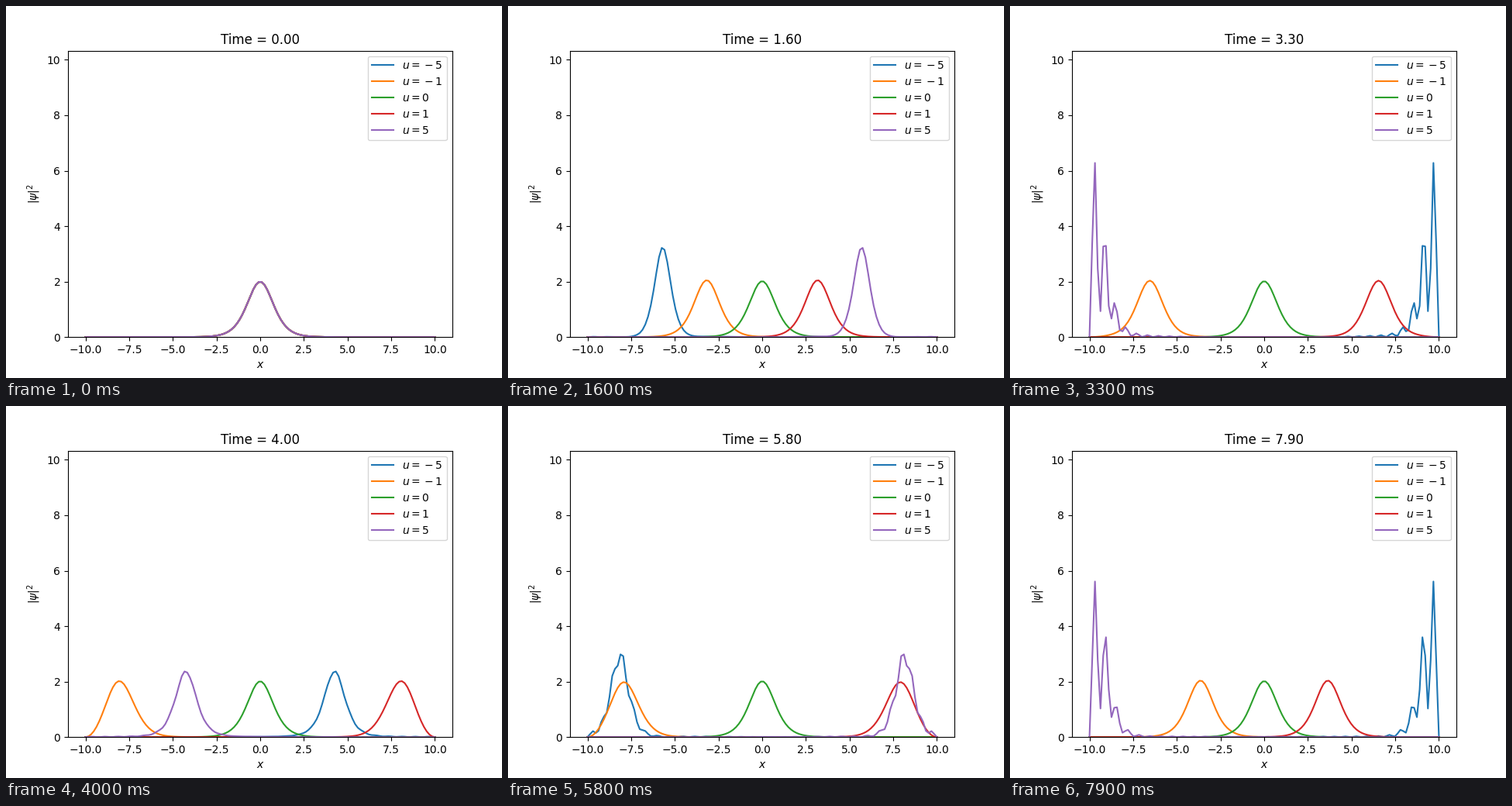
Write a matplotlib script that moves like this. It is 640 by 480 pixels and loops after 8000 ms.

```python
import numpy as np
import matplotlib.pyplot as plt
from matplotlib.animation import FuncAnimation

# Solitons of i psi_t = -psi_xx - |psi|^2 psi between hard walls
SPEEDS = [-5, -1, 0, 1, 5]
FRAMES = 80
FRAME_DT = 0.1
SUBSTEPS = 50

x = np.linspace(-10, 10, 128)
h = x[1] - x[0]


def rate(psi):
    out = np.zeros_like(psi)
    mid = psi[:, 1:-1]
    lap = (psi[:, 2:] - 2 * mid + psi[:, :-2]) / h**2
    out[:, 1:-1] = 1j * (lap + np.abs(mid) ** 2 * mid)
    return out


def rk4(psi, dt):
    k1 = rate(psi)
    k2 = rate(psi + dt / 2 * k1)
    k3 = rate(psi + dt / 2 * k2)
    k4 = rate(psi + dt * k3)
    return psi + dt / 6 * (k1 + 2 * k2 + 2 * k3 + k4)


def simulate():
    u = np.array(SPEEDS)[:, None]
    psi = np.sqrt(2) / np.cosh(x) * np.exp(1j * u * x)
    history = [np.abs(psi) ** 2]
    for _ in range(FRAMES - 1):
        for _ in range(SUBSTEPS):
            psi = rk4(psi, FRAME_DT / SUBSTEPS)
        history.append(np.abs(psi) ** 2)
    return history


density = simulate()

fig, ax = plt.subplots(figsize=(6.4, 4.8), dpi=100)
lines = [ax.plot(x, d, label=f"$u={u}$")[0] for u, d in zip(SPEEDS, density[0])]
ax.set_xlim(-11, 11)
ax.set_ylim(0, 10.33)
ax.set_xlabel("$x$")
ax.set_ylabel(r"$|\psi|^2$")
ax.legend(loc="upper right")
title = ax.set_title("Time = 0.00")


def update(i):
    for line, d in zip(lines, density[i]):
        line.set_ydata(d)
    title.set_text(f"Time = {i * FRAME_DT:.2f}")
    return [*lines, title]


anim = FuncAnimation(fig, update, frames=FRAMES, interval=100,
                     repeat=True, repeat_delay=0, blit=False)
plt.show()
```
